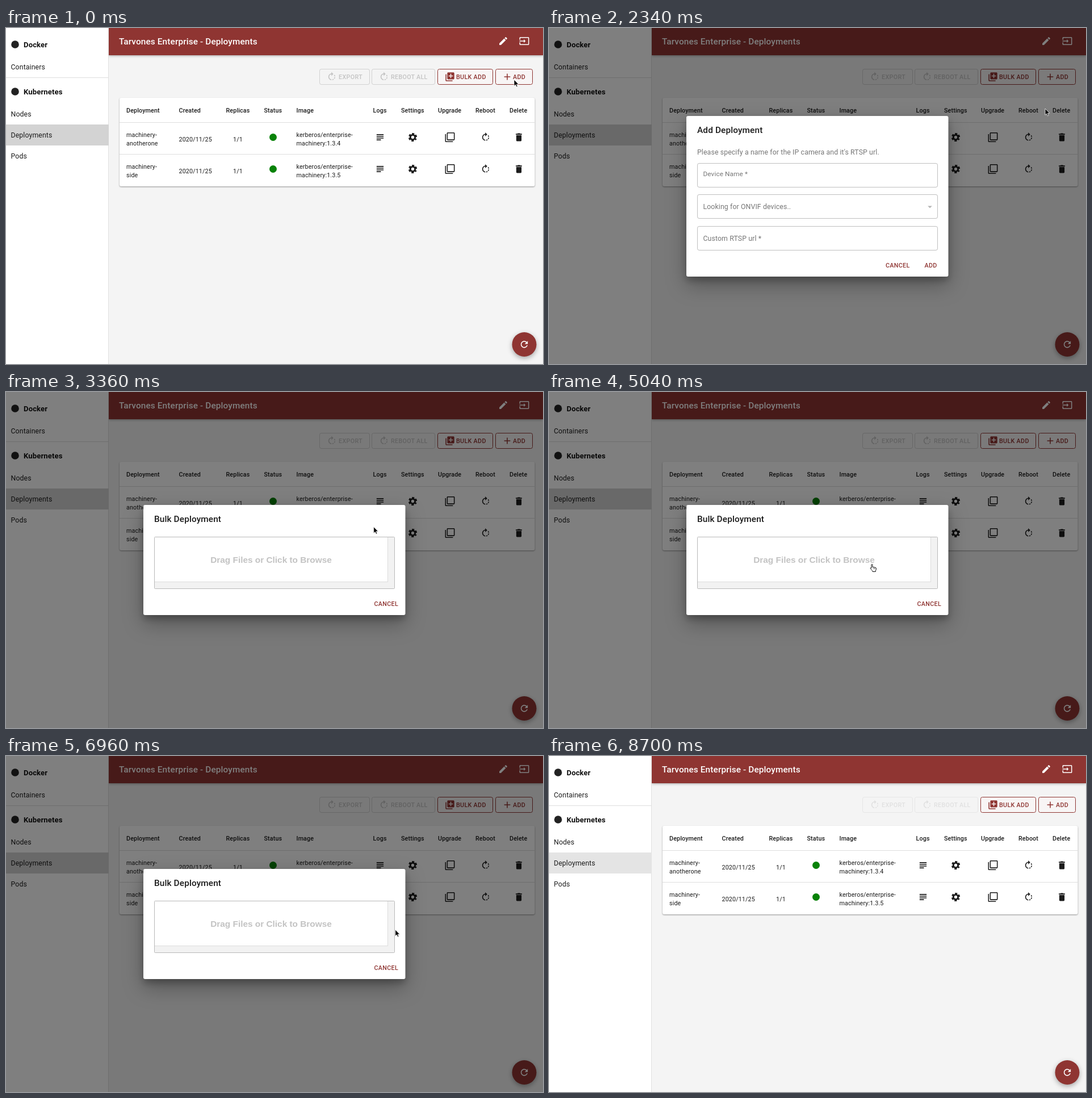
An HTML page that plays this animation: 946x592 px, repeating every 8760 ms.

```html
<!DOCTYPE html>
<html lang="en">
<head>
<meta charset="utf-8">
<title>Deployments</title>
<style>
html, body { margin: 0; width: 100%; height: 100%; overflow: hidden; background: #f4f4f4; }
svg { display: block; }
text { font-family: Roboto, sans-serif; letter-spacing: .115px; white-space: pre; }
.btn { letter-spacing: .307px; }
.sys { font-family: Inter, sans-serif; letter-spacing: -.05px; }
.drop { font-family: "Liberation Sans", Arial, sans-serif; letter-spacing: 0; }
.bar { filter: drop-shadow(0 1.5px 2px rgba(0,0,0,.32)); }
.card { filter: drop-shadow(0 1px 1.3px rgba(0,0,0,.4)); }
.fab { filter: drop-shadow(0 3px 4px rgba(0,0,0,.32)); }
.paper { filter: drop-shadow(0 7px 6px rgba(0,0,0,.22)) drop-shadow(0 13px 17px rgba(0,0,0,.3)); }
.sheet { filter: drop-shadow(0 5px 9px rgba(0,0,0,.35)); }
</style>
</head>
<body>
<svg id="stage" xmlns="http://www.w3.org/2000/svg" width="946" height="592" viewBox="0 0 946 592"></svg>
<script>
const LOOP = 8760, RED = '#8f3532', INK = '#1c1c1c', SOFT = 'rgba(0,0,0,.54)';
const UNIT = 0.7688, BODY = 12.3, CELL = 10.76, TITLE = 15.38;

const ICONS = {
  lines: 'M14 17H4v2h10v-2zm6-8H4v2h16V9zM4 15h16v-2H4v2zM4 5v2h16V5H4z',
  copy: 'M3 5H1v16c0 1.1.9 2 2 2h16v-2H3V5zm18-4H7c-1.1 0-2 .9-2 2v14c0 1.1.9 2 2 2h14c1.1 0 2-.9 2-2V3c0-1.1-.9-2-2-2zm0 16H7V3h14v14z',
  rotate: 'M15.55 5.55L11 1v3.07C7.06 4.56 4 7.92 4 12s3.05 7.44 7 7.93v-2.02c-2.84-.48-5-2.94-5-5.91s2.16-5.43 5-5.91V10l4.55-4.45zM19.93 11c-.17-1.39-.72-2.73-1.62-3.89l-1.42 1.42c.54.75.88 1.6 1.02 2.47h2.02zM13 17.9v2.02c1.39-.17 2.74-.71 3.9-1.61l-1.44-1.44c-.75.54-1.59.89-2.46 1.03zm3.89-2.42l1.42 1.41c.9-1.16 1.45-2.5 1.62-3.89h-2.02c-.14.87-.48 1.72-1.02 2.48z',
  trash: 'M6 19c0 1.1.9 2 2 2h8c1.1 0 2-.9 2-2V7H6v12zM19 4h-3.5l-1-1h-5l-1 1H5v2h14V4z',
  pencil: 'M3 17.25V21h3.75L17.81 9.94l-3.75-3.75L3 17.25zM20.71 7.04c.39-.39.39-1.02 0-1.41l-2.34-2.34c-.39-.39-1.02-.39-1.41 0l-1.83 1.83 3.75 3.75 1.83-1.83z',
  exit: 'M21 3.01H3c-1.1 0-2 .9-2 2V9h2V4.99h18v14.03H3V15H1v4.01c0 1.1.9 1.98 2 1.98h18c1.1 0 2-.88 2-1.98v-14c0-1.11-.9-2-2-2zM11 16l4-4-4-4v3H1v2h10v3z',
  refresh: 'M17.65 6.35C16.2 4.9 14.21 4 12 4c-4.42 0-7.99 3.58-7.99 8s3.57 8 7.99 8c3.73 0 6.84-2.55 7.73-6h-2.08c-.82 2.33-3.04 4-5.65 4-3.31 0-6-2.69-6-6s2.69-6 6-6c1.66 0 3.14.69 4.22 1.78L13 11h7V4l-2.35 2.35z',
  plus: 'M19 13h-6v6h-2v-6H5v-2h6V5h2v6h6v2z',
  stack: 'M4 6H2v14c0 1.1.9 2 2 2h14v-2H4V6zm16-4H8c-1.1 0-2 .9-2 2v12c0 1.1.9 2 2 2h12c1.1 0 2-.9 2-2V4c0-1.1-.9-2-2-2zm-1 9h-4v4h-2v-4H9V9h4V5h2v4h4v2z',
  caret: 'M7 10l5 5 5-5z'
};

// Markup helpers
const text = (x, y, s, size, fill = INK, weight = 400, more = '') =>
  `<text x="${x}" y="${y}" font-size="${size}" fill="${fill}" font-weight="${weight}" ${more}>${s}</text>`;
const rect = (x, y, w, h, fill, more = '') =>
  `<rect x="${x}" y="${y}" width="${w}" height="${h}" fill="${fill}" ${more}/>`;
const icon = (name, cx, cy, fill = INK) =>
  `<path transform="translate(${cx} ${cy}) scale(${UNIT}) translate(-12 -12)" fill="${fill}" d="${ICONS[name]}"/>`;
const label = (x, y, s, fill = RED) => text(x, y, s, CELL, fill, 500, 'class="btn"');
const hair = (x, y, w, fill = '#dedede') => rect(x, y, w, 1, fill);

function gear(cx, cy) {
  const r = 8.2, step = 2 * Math.PI * r / 6, tooth = 5;
  return `<g transform="translate(${cx} ${cy}) scale(${UNIT})" fill="none" stroke="${INK}">
    <circle r="5.4" stroke-width="3.9"/>
    <circle r="${r}" stroke-width="3.4" stroke-dasharray="${tooth} ${step - tooth}" stroke-dashoffset="${tooth / 2}" transform="rotate(30)"/></g>`;
}

function button(x, w, glyph, gx, tx, s, off) {
  const ink = off ? 'rgba(0,0,0,.2)' : RED, line = off ? 'rgba(0,0,0,.14)' : RED;
  return rect(x + .5, 72.5, w - 1, 27, off ? 'none' : '#f8f5f5', `rx="3" stroke="${line}"`) +
    icon(glyph, gx, 86, ink) + label(tx, 90, s, ink);
}

function sidebar() {
  const item = (y, s) => text(8.5, y + 4.5, s, BODY);
  const group = (y, s) => `<circle cx="16" cy="${y}" r="6.8" fill="#222"/>` + text(31, y + 4.7, s, 13.1, '#111', 700);
  return rect(0, 0, 181, 592, '#fff') + rect(180, 0, 1, 592, '#e0e0e0') +
    rect(0, 170, 181, 37, '#d3d3d3', 'id="row"') + hair(0, 87, 181) +
    group(29, 'Docker') + item(68, 'Containers') + group(112, 'Kubernetes') +
    item(151, 'Nodes') + item(188, 'Deployments') + item(225, 'Pods');
}

function tableRow(y, name, version) {
  return text(212, y - 1, 'machinery-', CELL) + text(212, y + 14, name, CELL) +
    text(304.5, y + 7, '2020/11/25', CELL) + text(400, y + 7, '1/1', CELL) +
    `<circle cx="470.5" cy="${y}" r="6.5" fill="#088208"/>` +
    text(511.5, y - 1, 'kerberos/enterprise-', CELL) + text(511.5, y + 14, 'machinery:' + version, CELL) +
    icon('lines', 659, y) + gear(716.5, y) + icon('copy', 782, y) + icon('rotate', 845, y) + icon('trash', 903.5, y);
}

function app() {
  const heads = { Deployment: 212, Created: 304.5, Replicas: 387.5, Status: 454.5, Image: 511.5,
    Logs: 646.5, Settings: 696, Upgrade: 761, Reboot: 827, Delete: 887 };
  return rect(0, 0, 946, 592, '#f4f4f4') +
    rect(181, 0, 765, 48, RED, 'class="bar"') + sidebar() +
    text(199, 28.6, 'Tarvones Enterprise - Deployments', TITLE, '#fff', 500) +
    icon('pencil', 876, 23, '#fff') + icon('exit', 913, 23, '#fff') +
    '<g id="disabled">' + button(552, 89, 'rotate', 574, 586, 'EXPORT', true) +
    button(644, 112, 'rotate', 666, 678, 'REBOOT ALL', true) + '</g>' +
    button(760, 98, 'stack', 782, 793, 'BULK ADD') + button(862, 66, 'plus', 883, 893, 'ADD') +
    rect(760, 72, 98, 28, RED, 'rx="3" id="bulkFill"') + rect(862, 72, 66, 28, RED, 'rx="3" id="addFill"') +
    rect(200, 123, 731.5, 156, '#fff', 'rx="3" class="card"') + hair(200, 166, 731.5) + hair(200, 222, 731.5) +
    Object.entries(heads).map(([s, x]) => text(x, 148.8, s, CELL, INK, 500)).join('') +
    tableRow(192.5, 'anotherone', '1.3.4') + tableRow(248.5, 'side', '1.3.5') +
    `<circle cx="913" cy="557.5" r="21.5" fill="${RED}" class="fab"/>` + icon('refresh', 913, 557.5, '#fff');
}

const paper = (y, h, title) => rect(242, y, 461.5, h, '#fff', 'rx="3" class="paper"') +
  text(261, y + 30, title, TITLE, '#1b1b1b', 500);
const field = (y, more = 'stroke="rgba(0,0,0,.25)"') => rect(261.5, y + .5, 423, 42, 'none', 'rx="3" ' + more);

function addDialog() {
  return paper(155, 283, 'Add Deployment') +
    text(261, 223.3, "Please specify a name for the IP camera and it's RTSP url.", BODY, SOFT) +
    field(238) + field(238, `id="focus" stroke="${RED}" stroke-width="1.54"`) +
    rect(268, 236, 66, 5, '#fff', 'id="notch"') +
    `<g id="name">${text(0, 0, 'Device Name *', BODY, 'inherit')}</g>` +
    field(293) + text(271.5, 319, 'Looking for ONVIF devices..', BODY, SOFT) + icon('caret', 671, 315, 'rgba(0,0,0,.3)') +
    field(349) + text(271.5, 374.5, 'Custom RTSP url *', BODY, SOFT) +
    label(593, 422, 'CANCEL') + label(661.5, 422, 'ADD');
}

function bulkDialog() {
  return paper(199, 194, 'Bulk Deployment') +
    rect(261.5, 255.5, 423, 91, '#f2f2f2', 'rx="1" stroke="#b9b9b9"') +
    rect(262, 256, 411, 79, '#dcdcdc') + rect(262, 256, 410, 78, '#fff') +
    text(467, 300.5, 'Drag Files or Click to Browse', TITLE, '#c3c3c3', 700, 'text-anchor="middle" class="drop"') +
    label(648.5, 377.3, 'CANCEL');
}

function sheet() {
  const sys = (x, y, s, size, fill, weight, more = '') => text(x, y, s, size, fill, weight, 'class="sys" ' + more);
  const folder = (x, y, w, h, fill, line) =>
    `<path d="M${x} ${y + h / 2}v${-h}h${w * .38}l1.5 1.6h${w * .62 - 1.5}v${h - 1.6}z" fill="${fill}" stroke="${line}" stroke-width=".9"/>`;
  const line = d => `<path d="${d}" fill="none" stroke="#555" stroke-width="1.1"/>`;
  const places = ['Recents', 'Applications', 'Desktop', 'Downloads', 'Tumbrel', 'taldoren-io', 'FarShelf - S...', 'Artisan Vaul...'];
  const files = ['allowall.yaml', 'calico-egres.yaml', 'metalLB.yaml', 'minio', 'mongo.yaml', 'README.md', 'volume_mongodb.yaml'];
  const place = (y, s) => sys(196.7, y + 3.5, s, 9.6, '#262626');
  const head = (y, s) => sys(173, y + 3, s, 8.4, '#777', 600);
  const press = (x, w, s, ink, fill, edge) => rect(x + .5, 292, w - 1, 15.5, fill, `rx="3" stroke="${edge}" stroke-width=".8"`) +
    sys(x + w / 2, 303.3, s, 9.7, ink, 400, 'text-anchor="middle"');

  let out = rect(166, -12, 614.5, 328, '#fff', 'class="sheet"') +
    rect(166, -12, 614.5, 15, '#cfcfcf') + rect(166, 3, 119.5, 280, 'url(#side)') + rect(285, 3, 1, 280, '#c6c6c6') +
    rect(277, 5, 6, 153, '#a4a2a1', 'rx="3"');
  for (const x of [433, 590.5, 748.5]) out += rect(x, 3, 10.5, 280, '#f4f4f4', 'stroke="#e2e2e2" stroke-width=".8"');
  out += rect(436, 274, 1, 7, '#999') + rect(439, 274, 1, 7, '#999') +
    rect(166, 283, 614.5, 33, 'url(#foot)') + hair(166, 283, 614.5, '#c2c2c2');

  out += head(15, 'Favourites') + places.map((s, i) => place(32 + 20 * i, s)).join('');
  for (let i = 4; i < 8; i++) out += folder(181, 32 + 20 * i, 12.5, 9.5, '#aaa8a7', '#5e5e5e');
  out += rect(181.5, 27, 11, 10, 'none', 'rx="1.5" stroke="#555"') + line('M182 30H192M187 32v2.5h3') +
    line('M181.5 57L187 46.5L192.5 57M183 54H191') + rect(181, 67.5, 12, 9, 'none', 'rx="1" stroke="#555"') + line('M181 74H193') +
    '<circle cx="187" cy="92" r="5.6" fill="#555"/><path d="M187 88.5v6M184.5 92.5l2.5 2.5 2.5-2.5" fill="none" stroke="#eee" stroke-width="1.2"/>';
  out += head(197, 'oVault') + place(214, 'oVault Disk') +
    line('M183.5 218.5a3 3 0 0 1 0-5.5a4 4 0 0 1 7-1a3.3 3.3 0 0 1 .5 6.5z') +
    head(239, 'Locations') + place(257, 'K71QD4W8RB...') + rect(182.5, 252.5, 9.5, 6.5, 'none', 'stroke="#666"') + line('M180.5 261H194') +
    place(277, 'Norvela Dri...') + folder(181, 277, 12.5, 9.5, '#aaa8a7', '#5e5e5e') + '<circle cx="187.3" cy="277.6" r="2.3" fill="#555"/>' +
    '<path d="M262 276.5l3.5-4 3.5 4zM262 278h7v1.3h-7z" fill="#666"/>';

  files.forEach((s, i) => {
    const y = 9.6 + 13.9 * i, dir = s === 'minio';
    out += sys(306, y + 3.3, s, 9.15, dir ? '#1a1a1a' : '#b0b0b0');
    out += dir ? folder(291.5, y, 11, 8.5, '#6cc0ef', '#55afe2') :
      rect(293.5, y - 4.5, 7, 9, '#fafafa', 'stroke="#cfcfcf" stroke-width=".8"') + rect(295, y - 1.5, 4, 4, s === 'README.md' ? '#e3cfc6' : '#b9c6d4');
  });
  return out + '<path d="M426 48.5l5 3-5 3z" fill="#666"/>' +
    press(174, 64, 'Options', '#222', '#fff', '#bcbcbc') + press(647, 59, 'Cancel', '#222', '#fff', '#bcbcbc') +
    press(713, 59.5, 'Open', '#b3b3b3', '#e3e3e3', '#cacaca');
}

const grad = (id, a, b) => `<linearGradient id="${id}" x2="0" y2="1"><stop stop-color="${a}"/><stop offset="1" stop-color="${b}"/></linearGradient>`;
document.getElementById('stage').innerHTML =
  `<defs>${grad('side', '#dedad9', '#dfdedd')}${grad('foot', '#dcdcdc', '#cfcfcf')}</defs>` + app() +
  rect(0, 0, 946, 592, '#000', 'id="shade"') +
  `<g id="add">${addDialog()}</g><g id="bulk">${bulkDialog()}</g><g id="sheet">${sheet()}</g>
  <g id="cursor"><path id="arrow" d="M0 0V11.3L2.6 8.9 4.3 12.8 6.2 12 4.5 8.2H8Z" fill="#000" stroke="#fff" stroke-width=".8"/>
  <g id="hand"><path transform="translate(-3.2 0)" d="M2.2 6.8V1.1q0-1.1 1-1.1t1 1.1V5q2.2-.3 6 1.2.5.2.5 1.2-.1 2.6-1.2 4v1.6H4.2V12Q2.6 10 .6 7.6 0 6.4 1 6.1 1.7 6 2.2 6.8Z" fill="#fff" stroke="#111"/>
  <path d="M3 6v2.5M5 6.3v2.3" stroke="#111" stroke-width=".7"/></g></g>`;

const el = {};
document.querySelectorAll('[id]').forEach(n => el[n.id] = n);

// Motion helpers
const ramp = (t, from, len) => Math.min(1, Math.max(0, (t - from) / len));
function bezier(x, x1, x2) {
  let lo = 0, hi = 1, s = .5;
  for (let i = 0; i < 24; i++) {
    s = (lo + hi) / 2;
    const v = 3 * (1 - s) ** 2 * s * x1 + 3 * (1 - s) * s * s * x2 + s ** 3;
    if (v < x) lo = s; else hi = s;
  }
  return 3 * (1 - s) * s * s + s ** 3;
}
const inOut = x => x <= 0 ? 0 : x >= 1 ? 1 : bezier(x, .4, .2);
const out = x => x <= 0 ? 0 : x >= 1 ? 1 : bezier(x, 0, .2);
const shown = (t, open, close) => t < close ? inOut(ramp(t, open, 225)) : 1 - inOut(ramp(t, close, 195));
const hover = (t, on, off) => out(ramp(t, on, 180)) - out(ramp(t, off, 220));

const EXIT = 7740;
const PATH = [[0, 895, 91], [1300, 895, 91], [1900, 874, 142], [2420, 874, 142], [2700, 819.5, 93.5],
  [2960, 819.5, 93.5], [3600, 569, 303.5], [5700, 569, 303.5], [6200, 676, 301], [6850, 676, 301],
  [7300, 740, 334], [EXIT, 740, 334], [7860, 628, 349], [8000, 445, 418], [8160, 181, 547], [8280, -20, 610]];

function pointer(t) {
  const i = PATH.findIndex(p => p[0] > t);
  if (i < 0) return PATH[PATH.length - 1].slice(1);
  const [t0, x0, y0] = PATH[i - 1], [t1, x1, y1] = PATH[i];
  let k = (t - t0) / (t1 - t0);
  if (t < EXIT) k = k * k * (3 - 2 * k);
  return [x0 + (x1 - x0) * k, y0 + (y1 - y0) * k];
}

const show = (n, on) => n.setAttribute('visibility', on ? 'visible' : 'hidden');
const fade = (n, v) => { n.setAttribute('opacity', v); show(n, v > 0); };

function draw(t) {
  const add = shown(t, 300, 2350), bulk = shown(t, 2838, 7409);
  fade(el.add, add);
  fade(el.bulk, bulk);
  fade(el.shade, .5 * Math.max(add, bulk));
  fade(el.addFill, hover(t, 60, 400));
  fade(el.bulkFill, hover(t, 2640, 2960));

  const blur = 2242, focused = t > 330 && t < blur;
  const lift = out(ramp(t, 330, 200)) - out(ramp(t, blur, 200));
  fade(el.focus, focused ? add : 0);
  fade(el.notch, lift > .5 ? add : 0);
  el.name.setAttribute('transform', `translate(271.5 ${263.8 - 20 * lift}) scale(${1 - .25 * lift})`);
  el.name.firstChild.setAttribute('fill', focused ? RED : SOFT);

  const down = out(ramp(t, 5100, 300)) - inOut(ramp(t, 6540, 240));
  el.sheet.setAttribute('transform', `translate(0 ${-340 * (1 - down)})`);
  show(el.sheet, down > 0);

  const [x, y] = pointer(t), hand = t >= 3660 && t < 5340;
  el.cursor.setAttribute('transform', `translate(${x} ${y})`);
  show(el.hand, hand);
  show(el.arrow, !hand);

  const settled = t >= 8000;
  el.row.setAttribute('fill', settled ? '#e4e4e4' : '#d3d3d3');
  el.disabled.setAttribute('opacity', settled ? .4 : 1);
}

const start = performance.now();
function tick() {
  draw((performance.now() - start) % LOOP);
  requestAnimationFrame(tick);
}
tick();
</script>
</body>
</html>
```
